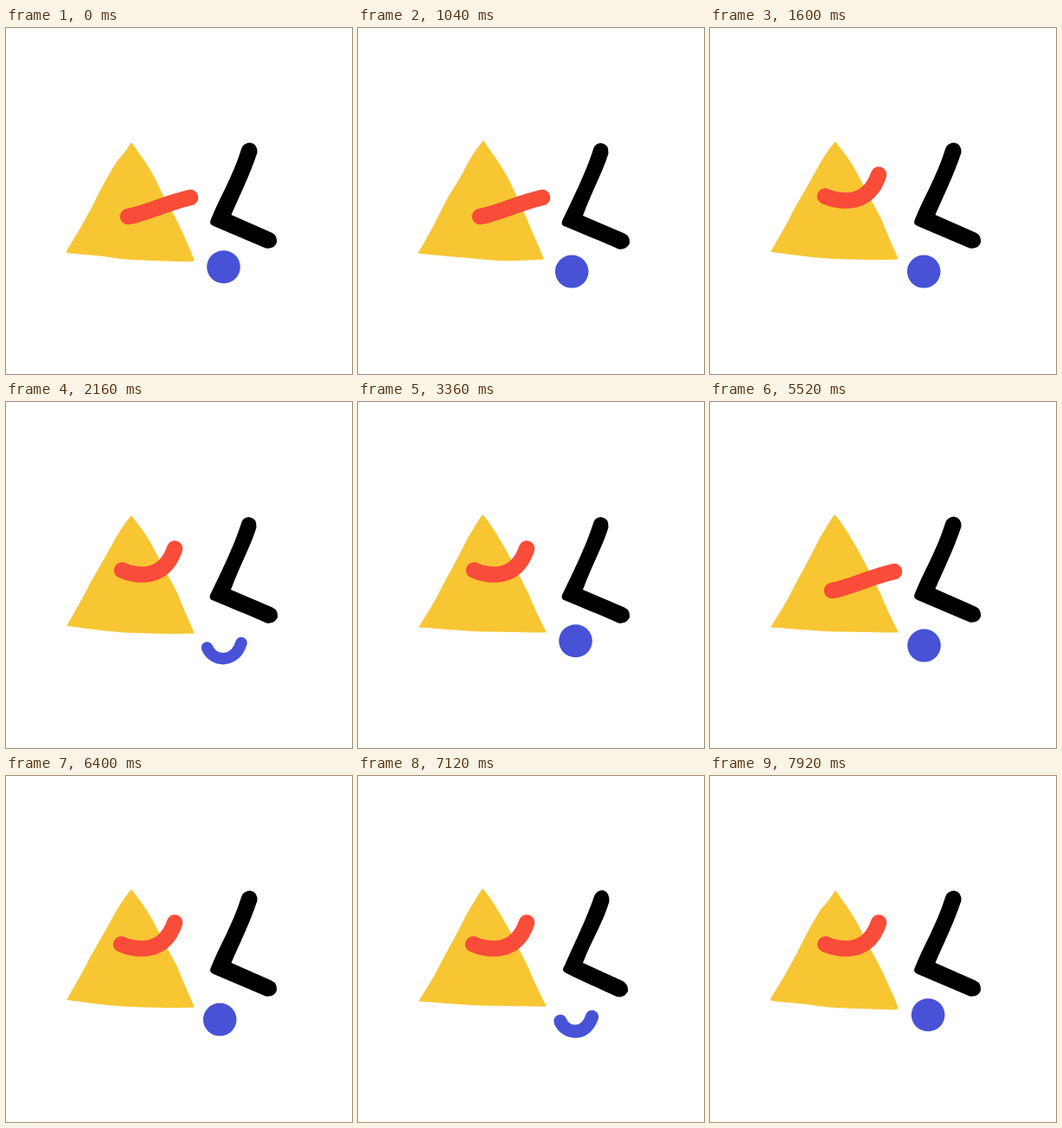
An HTML page that plays this animation: 400 by 400 pixels, repeating every 8000 ms.

```html
<!DOCTYPE html>
<html lang="en">
<head>
<meta charset="utf-8">
<title>Shapes</title>
<style>
  html, body { margin: 0; width: 100%; height: 100%; overflow: hidden; background: #fff; }
  svg { display: block; width: 100%; height: 100%; stroke-linecap: round; stroke-linejoin: round; }
</style>
</head>
<body>
<svg viewBox="0 0 400 400">
  <path id="triangle" fill="#f7c632" stroke="#f7c632" stroke-width="1.2"/>
  <path id="bar" fill="none" stroke="#f94c39" stroke-width="18.5"/>
  <path id="angle"/>
  <path id="dot" fill="none" stroke="#4752d7"/>
</svg>
<script>
const LOOP = 8000, CYCLE = 4800, STEP = 80, BOIL = 160;
const [triangle, bar, angle, dot] =
  ['triangle', 'bar', 'angle', 'dot'].map(id => document.getElementById(id));

// Hand-drawn versions that alternate to make the outlines boil
const TRIANGLES = [
  'M145 133C152 144 166 160 175 181C182 197 189 206 200 229C206 242 212 255 217 268Q216 270 211 269.5C180 269 150 268 129 266C108 262 94 262 71 259.5Q70 258 71 257C83 238 91 224 100 207C110 186 117 173 129 154C136 147 140 141 145 133Z',
  'M145 131C152 142 164 156 173 174C182 191 186 203 194 219C202 240 209 253 214 267C190 268 165 270 145 267C122 264 100 264 70 260C84 238 92 220 104 197C111 184 117 178 123 165C131 149 138 139 145 131Z',
  'M145 132C153 143 162 153 170 169C179 187 189 205 198 222C204 239 211 252 217 267C190 268 172 267 148 266.5C118 265 100 262 71 258.5C79 244 88 230 97 211C108 192 115 180 127 158C134 146 139 139 145 132Z',
  'M144 131C153 141 161 155 168 167C178 184 187 203 197 223C203 239 210 252 217 266C190 266 170 265 146 265C120 264 100 262 71 260C81 244 88 234 96 217C107 196 115 183 126 160C133 148 139 138 144 131Z'
];
const ANGLES = [
  'M272 140Q274 133 282 132.5Q291 134 290.5 144C282 170 269 196 260.5 216L307 236.5Q314 240 313 248Q310 256 300 254.5L240 229Q234 226 237 221C247 196 262 172 272 140Z',
  'M272 140Q274 133 281 133Q290 134 289.5 145C284 164 270 190 260 217L308 237.5Q315 241 314 249Q310 257 301 255.5C280 246 262 239 237 228.5Q234 226 237 221C247 200 264 166 272 140Z',
  'M273 139Q276 132 283 132Q290 134 289.5 145C284 168 270 190 261 218C276 224 295 231 308 238Q315 243 313 250Q309 255 299 254C280 246 262 236 239 229Q236 227 238 222C247 200 262 170 273 139Z',
  'M273 139Q276 132 283 132Q291 134 290.5 145C284 168 270 190 260 216L306 237Q313 241 312 249Q308 257 299 255C280 246 260 238 239 227Q235 224 239 219C247 200 264 166 273 139Z'
];
const TRIANGLE_ORDER = '031203212023102313200312030231';
const ANGLE_ORDER = '023120312301201320230123023201';

const BAR_FLAT = [141, 218, 160, 215, 186, 202, 213, 196];
const BAR_SMILE = [134, 194.5, 152, 202, 183, 206, 195, 169.5];
const DOT_SMILE = [232.5, 284, 240, 301.5, 265, 302, 272, 278.5];
const BAR_WOBBLE = [0.5, 0, -1, -0.7];

const ease = (t, from, to) => {
  const p = Math.min(1, Math.max(0, (t - from) / (to - from)));
  return p * p * (3 - 2 * p);
};
const mix = (a, b, p) => a + (b - a) * p;
const mixAll = (a, b, p) => a.map((v, i) => mix(v, b[i], p));
const curve = p => `M${p[0]} ${p[1]}C${p.slice(2).join(' ')}`;

function draw(time) {
  const t = Math.floor(time % LOOP / STEP) * STEP % CYCLE;
  const tick = Math.floor((t + STEP) / BOIL) % 30;
  triangle.setAttribute('d', TRIANGLES[TRIANGLE_ORDER[tick]]);
  angle.setAttribute('d', ANGLES[ANGLE_ORDER[tick]]);

  const bend = ease(t, 1120, 1520) - ease(t, 3760, 4240);
  const red = mixAll(BAR_FLAT, BAR_SMILE, bend);
  const wobble = BAR_WOBBLE[Math.floor(t / BOIL) % 4] * bend;
  red[0] += wobble;
  red[2] += wobble;
  bar.setAttribute('d', curve(red));

  // The dot opens into a smile, then closes again low or high
  const smile = ease(t, 0, 200) - ease(t, 280, 520) + ease(t, 2000, 2160) - ease(t, 2280, 2520);
  const low = ease(t, 200, 320) - ease(t, 2200, 2320);
  const jitter = (tick * 7 % 3 - 1) * 0.3;
  const x = mix(251.8, 247.2, low) + jitter, y = mix(276.3, 281.6, low);
  const point = [x - 0.3, y, x, y, x, y, x + 0.3, y];
  dot.setAttribute('d', curve(mixAll(point, DOT_SMILE, smile)));
  dot.setAttribute('stroke-width', mix(38, 13.5, smile));
}

function loop() {
  draw(performance.now());
  requestAnimationFrame(loop);
}
loop();
</script>
</body>
</html>
```
